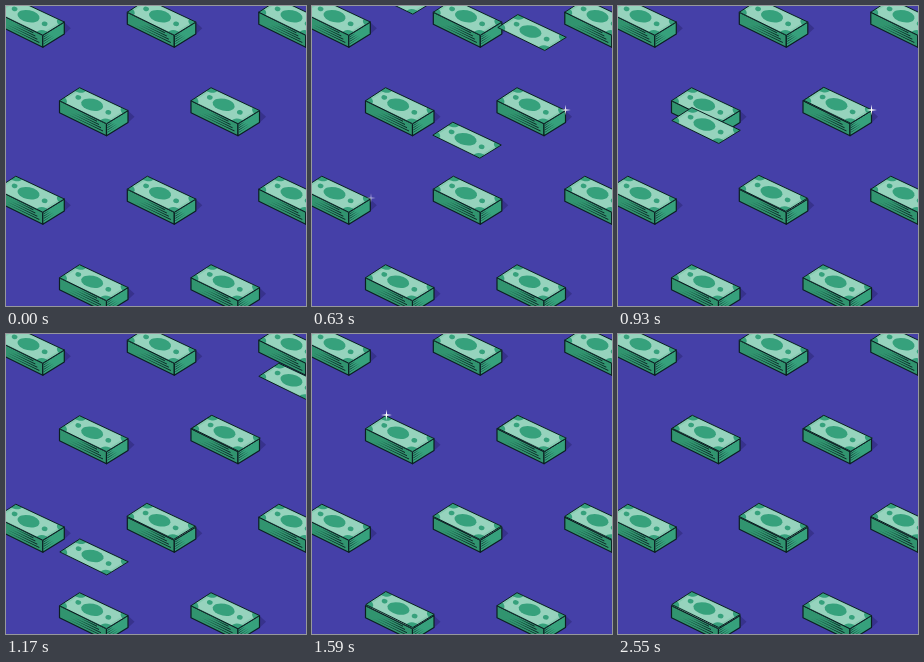
Recreate the animation shown at these times as an HTML page with a canvas. Size 300x300 px, loop 2740 ms.

```html
<!DOCTYPE html>
<html lang="en">
<head>
<meta charset="utf-8">
<title>Falling banknotes</title>
<style>
  html, body { margin: 0; width: 100%; height: 100%; overflow: hidden; background: #4540a8; }
  canvas { display: block; width: 300px; height: 300px; }
</style>
</head>
<body>
<canvas id="stage" width="300" height="300"></canvas>
<script>
const ctx = document.getElementById('stage').getContext('2d');
const LOOP = 2740, STEP = 30;
const INK = '#0b1f22', MINT = '#96d3bd', EDGE = '#84cab0', GREEN = '#36a17c', DEEP = '#31946f';

// Corners of a note: left, top, right, bottom
const NOTE = [[0.5, 13], [20.5, 0], [69, 22.8], [47.5, 36]];
const DEPTH = 12;

// x, y and time of a point on the fall, resting y, speed in px per ms
const falls = [
  { x: 120.3, y: 116.2, at: 630, rest: 169.3, speed: 0.267 },
  { x: 185.3, y: 8.5, at: 630, rest: 81.3, speed: 0.27 },
  { x: 53.3, y: -27.8, at: 630, rest: 257.5, speed: 0.431 },
  { x: 252.3, y: 29.3, at: 1170, rest: 169.3, speed: 0.336 },
  { x: 53.8, y: -2.4, at: 2250, rest: 81.3, speed: 0.283 }
];

const sparkles = [
  { x: 59, y: 192, start: 90 },
  { x: 253.5, y: 104, start: 520 },
  { x: 74.5, y: 81, start: 1280 }
];
const SPARKLE_LIFE = 600, SPARKLE_FADE = 130;

function polygon(points, fill, stroke) {
  ctx.beginPath();
  points.forEach(p => ctx.lineTo(...p));
  ctx.closePath();
  if (fill) { ctx.fillStyle = fill; ctx.fill(); }
  if (stroke) { ctx.strokeStyle = stroke; ctx.stroke(); }
}

function oval(x, y, rx, ry, angle = 0.2) {
  ctx.beginPath();
  ctx.ellipse(x, y, rx, ry, angle, 0, Math.PI * 2);
  ctx.fill();
}

function at(x, y, draw) {
  ctx.save();
  ctx.translate(x, y);
  draw();
  ctx.restore();
}

function note() {
  const inset = ([x, y]) => [x * 0.9 + 3.4, y * 0.9 + 1.8];
  ctx.lineWidth = 1;
  ctx.lineJoin = 'round';
  polygon(NOTE, EDGE);
  ctx.save();
  ctx.clip();
  polygon(NOTE.map(inset), MINT);
  ctx.fillStyle = GREEN;
  NOTE.forEach(([x, y]) => oval(x, y, 7.5, 5));
  oval(33.2, 17, 11.2, 6);
  oval(19.3, 9.7, 2.9, 2.3);
  oval(49.3, 24.6, 2.9, 2.3);
  ctx.restore();
  polygon(NOTE, null, INK);
}

function stack() {
  const [left, , right, bottom] = NOTE;
  const drop = ([x, y]) => [x, y + DEPTH];
  polygon([[69, 23], [75.5, 29], [69, 35]], '#37328c');
  ctx.lineWidth = 1.2;
  ctx.lineJoin = 'round';
  polygon([left, bottom, drop(bottom), drop(left)], DEEP, INK);
  polygon([bottom, right, drop(right), drop(bottom)], GREEN, INK);
  // Page edges as strokes that taper away from the lower part of the pile
  for (let i = 1; i < 5; i++) {
    const y = i * 2.3, tip = 24 - i * 4, end = 36 + i * 2;
    polygon([[tip, 13 + y + tip * 0.48], [end, 12.6 + y + end * 0.48], [end, 13.5 + y + end * 0.48]], INK);
    const reach = 52 + i * 2;
    polygon([[48.5, 35 + y], [48.5, 35.7 + y], [reach, 65.1 + y - reach * 0.615]], INK);
  }
  note();
}

function star(r) {
  const waist = 0.9;
  ctx.fillStyle = '#fff';
  ctx.beginPath();
  for (let i = 0; i < 8; i++) {
    const radius = i % 2 ? waist : r, angle = i * Math.PI / 4;
    ctx.lineTo(Math.cos(angle) * radius, Math.sin(angle) * radius);
  }
  ctx.fill();
}

function sparkle({ x, y, start }, t) {
  const age = t - start;
  const glow = Math.max(0, Math.min(1, age / SPARKLE_FADE, (SPARKLE_LIFE - age) / SPARKLE_FADE));
  if (!glow) return;
  at(x, y, () => {
    ctx.globalAlpha = glow;
    star(4 + 1.5 * glow);
  });
}

function render(t) {
  ctx.fillStyle = '#4540a8';
  ctx.fillRect(0, 0, 300, 300);
  for (let row = 0; row < 4; row++) {
    for (let col = 0; col < 3; col++) {
      at((row % 2 ? 53 : -10.7) + col * 131.5, -6.8 + row * 88.5, stack);
    }
  }
  for (const f of falls) {
    at(f.x, Math.min(f.rest, f.y + (t - f.at) * f.speed), note);
  }
  sparkles.forEach(s => sparkle(s, t));
}

const began = performance.now();
function tick() {
  const t = (performance.now() - began) % LOOP;
  render(Math.floor(t / STEP) * STEP);
  requestAnimationFrame(tick);
}
tick();
</script>
</body>
</html>
```
